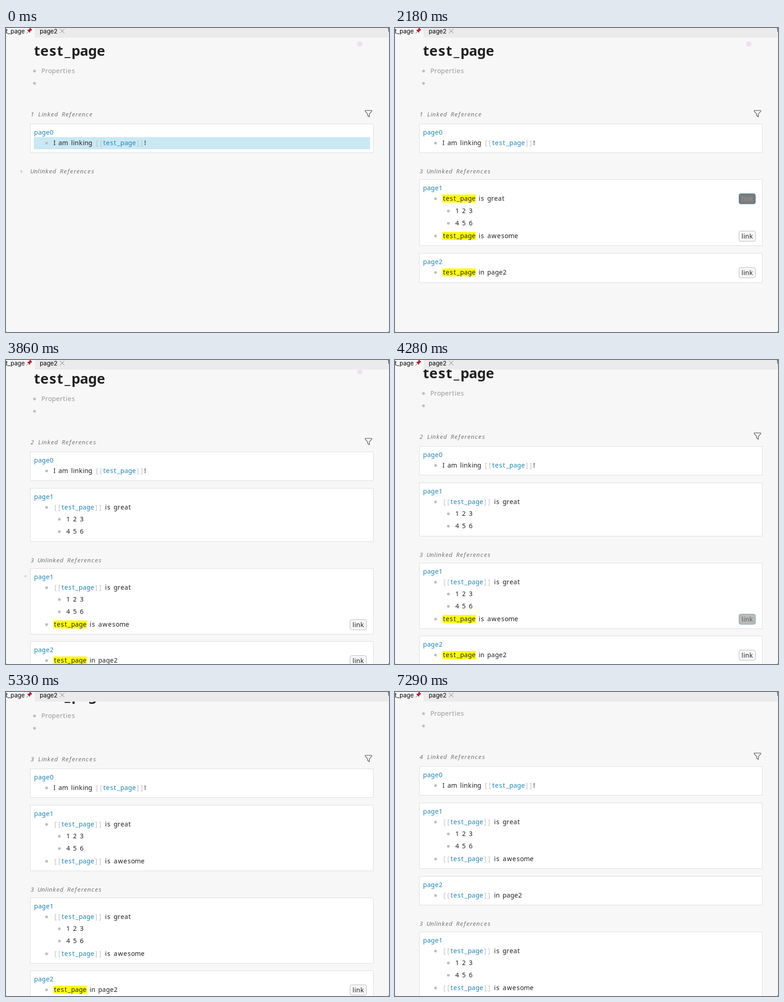
Write an HTML page that moves like this. It is 840 px wide and 667 px high and loops after 8000 ms.

```html
<!DOCTYPE html>
<html lang="en">
<head>
<meta charset="utf-8">
<title>Linked references</title>
<style>
  html, body { margin: 0; width: 100%; height: 100%; overflow: hidden; background: #f7f7f7; }
  svg { display: block; width: 840px; height: 667px; }
  .note { font-family: "Noto Sans", "Open Sans", sans-serif; text-anchor: middle; white-space: pre; }
  .tab { font: 13px Inter, Roboto, sans-serif; }
</style>
</head>
<body>
<svg viewBox="0 0 840 667">
  <rect width="840" height="667" fill="#f7f7f7"/>
  <g id="page"></g>
  <g id="tabs">
    <rect width="63" height="21" fill="#f7f7f7"/>
    <rect x="63" width="777" height="21" fill="#ebebeb"/>
    <text class="tab" x="41" y="11.5" text-anchor="end">test_page</text>
    <text class="tab" x="74" y="11.5">page2</text>
    <text class="tab" x="837.5" y="9" fill="#444">t</text>
    <g transform="translate(50.5 6.5) rotate(45)" fill="#c4162f">
      <rect x="-3.4" y="-6.6" width="6.8" height="2.4" rx="1"/>
      <path d="M-2.2 -4.5H2.2L2.6 -1L4.4 1.6H-4.4L-2.6 -1Z"/>
      <path d="M0 1.5V7.5" stroke="#8d8d95" stroke-width="1.1"/>
    </g>
    <path d="M118.5 2L128 11.3M128 2L118.5 11.3" stroke="#777" fill="none"/>
  </g>
  <path d="M0 665.5V667H1.5ZM840 665V667H838Z" fill="#555"/>
</svg>
<script>
const LOOP = 8000, STEP = 70;
const EM = 14.17, INK = "#222", LINK = "#1f86b4", BRACKET = "#bdbdbd";
const page = document.getElementById("page");

// Letter cells in em: narrow, half, wide and regular.
const cell = (ch, space) =>
  ch === " " ? space :
  "ilI".includes(ch) ? 0.3 :
  "tfr!".includes(ch) ? 0.45 :
  "mw".includes(ch) ? 0.9 : 0.6;

const width = (str, size = EM, space = 0.45) =>
  [...str].reduce((sum, ch) => sum + cell(ch, space) * size, 0);

function text(str, x, y, fill = INK, { size = EM, space = 0.45, weight = 500, style = "normal" } = {}) {
  const xs = [...str].map(ch => {
    const w = cell(ch, space) * size, mid = x + w / 2;
    x += w;
    return mid.toFixed(2);
  });
  return `<text class="note" x="${xs.join(" ")}" y="${y}" font-size="${size}" font-weight="${weight}" font-style="${style}" fill="${fill}">${str}</text>`;
}

const bullet = (x, y) => `<circle cx="${x}" cy="${y + 0.5}" r="3" fill="#bebebe"/>`;

const arrow = (x, y, turn = 90, fill = "#d6d6d6") =>
  `<path transform="translate(${x} ${y}) rotate(${turn})" d="M-2.2 -4L2.6 0L-2.2 4Z" fill="${fill}"/>`;

const heading = (str, y) =>
  text(str, 53.5, y + 4.5, "#777", { size: 13.4, space: 0.6, weight: 400, style: "italic" });

// Draws [text, colour] runs one after another.
function runs(list, x, y) {
  return list.map(([str, fill]) => {
    const out = text(str, x, y, fill);
    x += width(str);
    return out;
  }).join("");
}

const wikiLink = [["[[", BRACKET], ["test_page", LINK], ["]]", BRACKET]];

function button(y, heat) {
  const mix = (a, b) => Math.round(a + (b - a) * heat);
  const grey = mix(247, 124), ink = mix(34, 153);
  const edge = `rgb(${mix(184, 74)},${mix(184, 130)},${mix(184, 158)})`;
  return `<rect x="754.5" y="${y - 10.5}" width="36" height="22.5" rx="4" fill="rgb(${grey},${grey},${grey})" stroke="${edge}"/>` +
    text("link", 759.7, y + 5.7, `rgb(${ink},${ink},${ink})`);
}

function mention(tail, y, linked, heat) {
  if (linked) return bullet(89, y) + runs([...wikiLink, [" " + tail, INK]], 104.3, y + 5);
  return bullet(89, y) +
    `<rect x="104" y="${y - 8.5}" width="73.5" height="17.5" rx="1" fill="#ff0"/>` +
    runs([["test_page", INK], [" " + tail, INK]], 104.5, y + 5) + button(y, heat);
}

const nested = (str, y) => bullet(117, y) + text(str, 132, y + 5);

// Frame with a page name; returns its markup and bottom edge.
const card = (name, top, height, body) => ({
  end: top + height,
  svg: `<rect x="53.5" y="${top + 0.5}" width="752" height="${Math.round(height) - 1}" fill="#fff" stroke="#dcdcdc"/>` +
    body + text(name, 61.7, top + 24, LINK)
});

function firstCard(top, glow) {
  const y = top + 42;
  const band = glow ? `<rect x="61" y="${y - 12.5}" width="737.5" height="26.5" fill="${glow}"/>` : "";
  return card("page0", top, 64, band + bullet(89, y) +
    runs([["I am linking ", INK], ...wikiLink, ["!", INK]], 104.2, y + 5));
}

function greatCard(top, great, awesome, heat = 0) {
  const y = top + 42, sub = y + (great ? 26 : 27);
  let body = mention("is great", y, great, heat) + nested("1 2 3", sub) + nested("4 5 6", sub + 27);
  if (awesome === null) return card("page1", top, 118, body);
  body += mention("is awesome", sub + 55, awesome, great ? heat : 0);
  return card("page1", top, great ? 144.5 : 146, body);
}

const shortCard = (top, linked, heat) =>
  card("page2", top, linked ? 64 : 65, mention("in page2", top + 42, linked, heat));

// Value of the last key at or before t.
const hold = (t, keys) => keys.reduce((v, [at, next]) => t >= at ? next : v, keys[0][1]);
const during = (t, from, to) => t >= from && t < to;

function glowAt(t) {
  if (t < 710) return "#c9e8f3";
  if (t < 780) return "#dff4fa";
  if (t >= 1200) return "";
  const steps = Math.floor((t - 780) / STEP);
  return `rgb(${241 + 2 * steps},255,255)`;
}

function draw(t) {
  const count = hold(t, [[0, 1], [2810, 2], [4840, 3], [6590, 4]]);
  const scroll = hold(t, [[0, 0], [3860, 9], [3930, 16], [4000, 21], [5260, 31], [5330, 42], [5400, 48], [6590, 47]]);
  const heat = hold(t, [[0, 0], [2180, 1], [2810, 0], [4280, 0.5], [4350, 1], [4840, 0], [6030, 1]]);
  const open = t >= 710;
  let svg = "", end = 0;
  const add = c => { svg += c.svg; end = c.end; };
  const below = gap => Math.floor(end + gap);

  svg += text("test_page", 61.3, 60.5, INK, { size: 30.6, weight: 700 });
  svg += '<circle cx="776" cy="35" r="6" fill="#f0dff0"/>';
  svg += bullet(62.5, 94) + text("Properties", 77.6, 99, "#999") + bullet(62.5, 121);
  svg += heading(`${count} Linked Reference${count > 1 ? "s" : ""}`, 189.5);
  svg += '<path d="M788.5 181H801.5Q803 181.5 802 183L797 188.5V195L793 192V188.5L788 183Q787 181.5 788.5 181Z" fill="none" stroke="#757575" stroke-width="1.6" stroke-linejoin="round"/>';

  add(firstCard(210, glowAt(t)));
  if (count > 1) add(greatCard(below(16), true, count > 2 ? true : null));
  if (count > 3) add(shortCard(Math.round(end + 16), true, 0));

  svg += heading((open ? "3 " : "") + "Unlinked References", end + 40.5);
  if (t < 1200) {
    const turn = hold(t, [[0, 0], [710, 28], [780, 64], [850, 82], [920, 90]]);
    svg += arrow(34.3, end + 41, turn, t < 500 ? "#d0d0d0" : "#b4b4b4");
  }

  if (open) {
    const top = Math.round(end + 58);
    add(greatCard(top, count > 1, count > 2, heat));
    if (during(t, 1620, 2180)) svg += arrow(70.5, top + 42);
    if (during(t, 3370, 4210) || during(t, 7220, 7290)) svg += arrow(42.5, top + 18);
    const last = below(16);
    add(shortCard(last, count > 3, count === 3 ? heat : 0));
    if (during(t, 5960, 6030)) svg += arrow(42.5, last + 18);
  }
  return `<g transform="translate(0 ${-scroll})">${svg}</g>`;
}

let shown = "";
function tick(now) {
  const svg = draw(now % LOOP);
  if (svg !== shown) page.innerHTML = shown = svg;
  requestAnimationFrame(tick);
}
tick(0);
</script>
</body>
</html>
```
